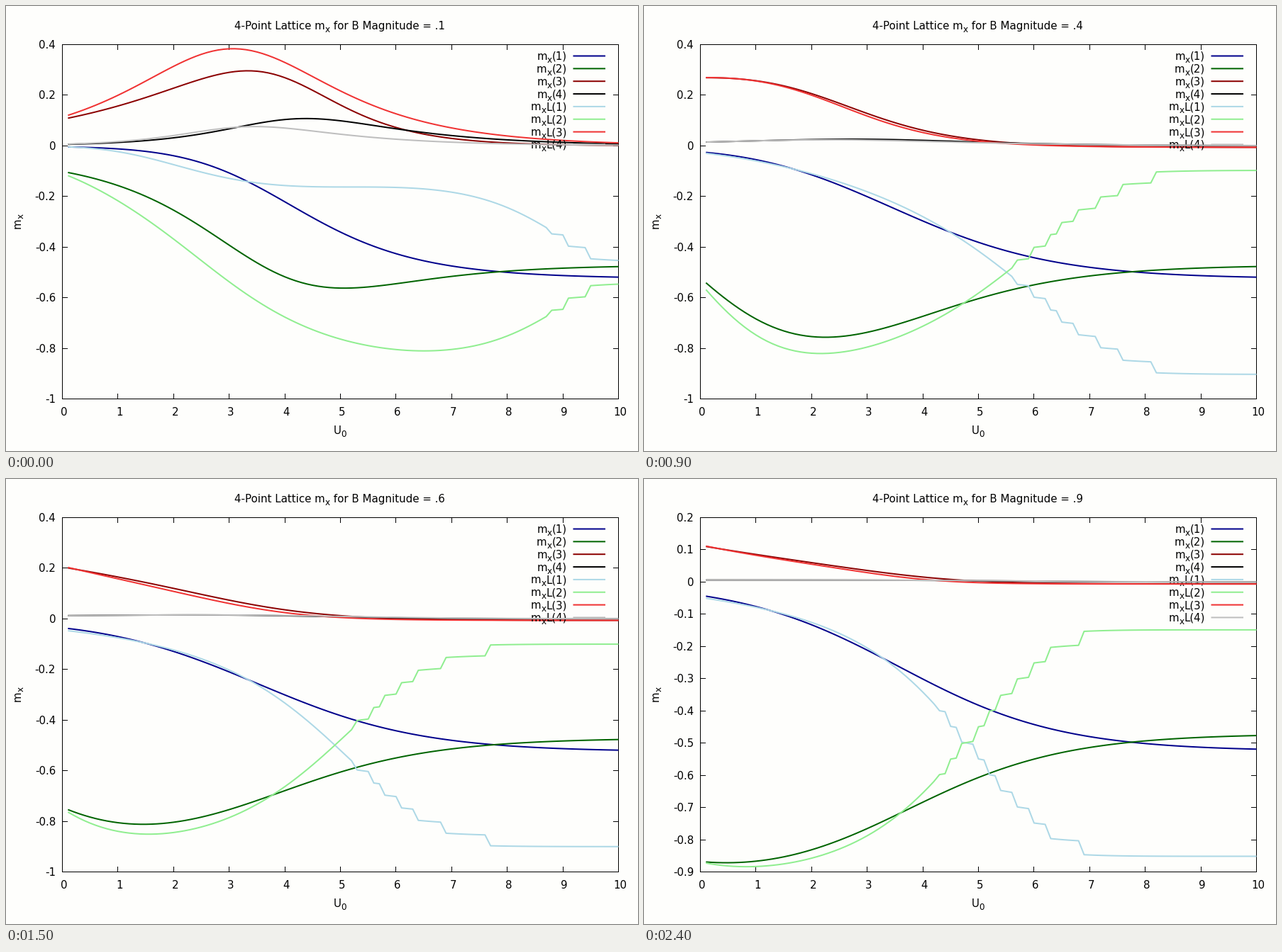
A matplotlib script that plays this animation: 891 px wide and 628 px high, repeating every 2.7 s.

```python
import numpy as np
import matplotlib.pyplot as plt
from matplotlib.animation import FuncAnimation

W, H, DPI = 891, 628, 72
LEFT, RIGHT, TOP, BOTTOM = 79.5, 863.5, 54.5, 554.5
FONT = 15
BACKGROUND = "#fefefc"
U = np.arange(1, 101) / 10
KEY_FIELDS = [.1, .2, .4, .6, .9]

plt.rcParams["font.family"] = "DejaVu Sans"


def sigmoid(x):
    return 1 / (1 + np.exp(-x))


def bump(rise_start, rise, fall_start, fall):
    """Exponential growth that turns into exponential decay."""
    return 1 / (np.exp(rise_start - rise * U) + np.exp(fall * (U - fall_start)))


def staircase(values, start, step=.05):
    """Let the curve lock into plateaus after start."""
    plateaus = step * np.round(values / step)
    return np.where(U > start, .85 * plateaus + .15 * values, values)


def magnetisations(field):
    """The eight curves at one field strength."""
    def at(*keys):
        return np.interp(np.log(field), np.log(KEY_FIELDS), keys)

    # Sites 1 and 2 are nearly complementary; the defect is what they lack.
    weak_field = at(2.41, 1.44, .57, .16, 0)
    reach = at(3.2, 2.5, 1.9, 1.6, 1.4)
    m1 = -.525 * sigmoid(.69 * (U - 3.57)
                         - weak_field * np.exp(-(U / reach) ** 1.4))
    defect = .004 + sigmoid(at(2.1, 1.17, -.2, -1.29, -2.35)
                            - at(.45, .7, .86, .7, .53) * U
                            - at(.085, .05, 0, 0, 0) * U ** 2)
    m2 = -1 - m1 + defect

    d = U - at(5.2, 4.3, 3.2, 1, 1)
    L1 = -at(.5, .81, .92, .9, .86) * sigmoid(
        at(-.73, -1.08, -1.29, -2.4, -2.3)
        + at(0, .36, .57, .55, .52) * d
        + at(.031, .0225, .012, .008, .012) * d ** 3)
    L1 = staircase(L1, at(8.7, 7.1, 5.6, 5.2, 4.2))
    L2 = -1 - L1 + sigmoid(at(2.07, 1.08, -.28, -1.35, -2.4)
                           - at(.92, 1.04, 1.15, 1.02, .82) * U)

    floor = at(0, .003, .006, .006, .006)
    m3 = bump(at(2.25, 1.61, 1.2, 1.49, 2.1), at(.42, .42, .1, -.12, -.22),
              at(3.3, 2.02, 1.25, 1.18, 1.26), at(.95, .87, .92, 1, 1.2))
    L3 = bump(at(2.15, 1.55, 1.2, 1.5, 2.1), at(.62, .6, .1, -.2, -.28),
              at(2.6, 1.62, 1.22, 1.4, 1.55), at(.6, .71, .97, 1.2, 1.55))
    m4 = bump(at(5.2, 4.45, 4.2, 4.35, 5.1), at(.9, .7, .4, .15, 0),
              at(1.2, -.2, -2, -.6, .6), at(.55, .59, .58, .8, 1))
    L4 = bump(at(5.05, 4.4, 4.15, 4.35, 5.1), at(1, .9, .5, .15, 0),
              at(-.05, -3.8, -4.4, -1, .4), at(.6, .42, .46, .7, .9))
    return m1, m2, m3 - floor, m4, L1, L2, L3 - floor, L4


LEGEND = [("(1)", "#00008b"), ("(2)", "#006400"), ("(3)", "#8b0000"),
          ("(4)", "#000000"), ("L(1)", "#add8e6"), ("L(2)", "#90ee90"),
          ("L(3)", "#f03232"), ("L(4)", "#bebebe")]

fig = plt.figure(figsize=(W / DPI, H / DPI), dpi=DPI, facecolor=BACKGROUND)
ax = fig.add_axes([0, 0, 1, 1])


def advance(text, size):
    def width(s):
        probe = fig.text(0, 0, s, fontsize=size)
        result = probe.get_window_extent().width
        probe.remove()
        return result
    return width(f"|{text}|") - width("||")


def measure(parts):
    """Turn (text, is_subscript) parts into (text, size, drop, start), width."""
    placed, start = [], 0
    for text, sub in parts:
        size = FONT * (.8 if sub else 1)
        placed.append((text, size, 4 if sub else 0, start))
        start += advance(text, size)
    return placed, start


layouts = {}


def write(x, y, *parts, align=.5, upright=False, z=1):
    """Put a line with subscripts at its baseline; align 0 left to 1 right."""
    if parts not in layouts:
        layouts[parts] = measure(parts)
    placed, width = layouts[parts]
    for text, size, drop, start in placed:
        along = start - align * width
        pos = (x + drop, y - along) if upright else (x + along, y + drop)
        ax.text(*pos, text, fontsize=size, color="black", ha="left",
                va="baseline", rotation=90 if upright else 0,
                rotation_mode="anchor", zorder=z)


def line(xs, ys, color="black", width=1, z=1):
    ax.plot(xs, ys, color=color, lw=width, zorder=z, snap=False,
            solid_capstyle="butt", solid_joinstyle="round")


def crisp(value):
    """Centre of the pixel that holds value."""
    return np.floor(value) + .5


def y_range(field):
    """Top, bottom and tick step of the autoscaled axis."""
    if field > .85:
        return .2, -.9, .1
    if field > .65:
        return .2, -1, .2
    return .4, (-.8 if .15 < field < .25 else -1), .2


def draw(frame):
    ax.clear()
    ax.set(xlim=(0, W), ylim=(H, 0))
    ax.axis("off")
    field = (frame + 1) / 10
    top, bottom, step = y_range(field)

    def to_x(u):
        return LEFT + (RIGHT - LEFT) * u / 10

    def to_y(v):
        return TOP + (BOTTOM - TOP) * (top - v) / (top - bottom)

    ax.add_patch(plt.Rectangle((LEFT, TOP), RIGHT - LEFT, BOTTOM - TOP,
                               fill=False, ec="black", lw=1, snap=False))
    for u in range(11):
        x = crisp(to_x(u))
        line([x, x], [TOP, TOP + 7.5])
        line([x, x], [BOTTOM, BOTTOM - 7.5])
        write(to_x(u) + 2, 578, (str(u), False))
    for k in range(round((top - bottom) / step) + 1):
        value = round(top - k * step, 1) + 0.0
        y = crisp(to_y(value))
        line([LEFT, LEFT + 7.5], [y, y])
        line([RIGHT, RIGHT - 7.5], [y, y])
        write(70, y + 5.5, (f"{value:g}", False), align=1)

    write(470.5, 33, ("4-Point Lattice m", False), ("x", True),
          (f" for B Magnitude = .{frame + 1}", False))
    write(471, 604, ("U", False), ("0", True))
    write(21, 303.5, ("m", False), ("x", True), upright=True)

    for i, values in enumerate(magnetisations(field)):
        name, color = LEGEND[i]
        y, z = 70.5 + 17.85 * i, i + 2
        write(791, y + 5.5, ("m", False), ("x", True), (name, False),
              align=1, z=z)
        line([799.5, 845], [y, y], color, 2, z)
        line(to_x(U), to_y(values), color, 2, z)
    return []


anim = FuncAnimation(fig, draw, frames=9, init_func=lambda: [],
                     interval=300, repeat=True, repeat_delay=0, blit=False)
plt.show()
```
